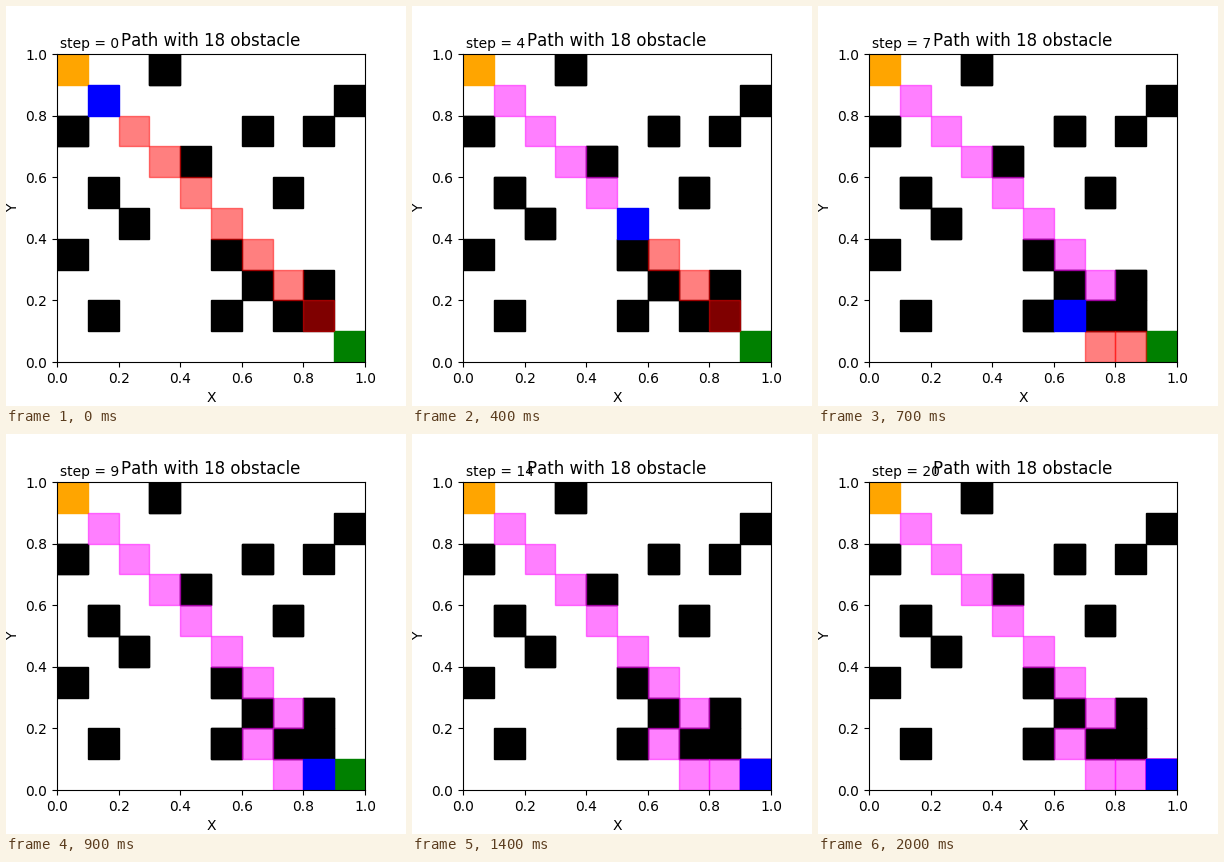
Write a matplotlib script that moves like this. It is 400 px wide and 400 px high and loops after 2.1 s.

```python
import matplotlib.pyplot as plt
from matplotlib.animation import FuncAnimation
from matplotlib.patches import Rectangle

N = 10
STEPS = 21
SIGHT = 2

# Cells are (column, row), row 0 at the top.
START, GOAL = (0, 0), (N - 1, N - 1)
BLOCKED_COLS = [[3], [9], [0, 6, 8], [4], [1, 7], [2], [0, 5], [6, 8], [1, 5, 7, 8]]
OBSTACLES = {(col, row) for row, cols in enumerate(BLOCKED_COLS) for col in cols}


def around(cell, reach=1):
    x, y = cell
    span = range(-reach, reach + 1)
    return [(x + dx, y + dy) for dx in span for dy in span
            if (dx or dy) and 0 <= x + dx < N and 0 <= y + dy < N]


def plan(origin, known):
    """Shortest way to the goal past the known obstacles, ties going down."""
    dist = {GOAL: 0}
    queue = [GOAL]
    for cell in queue:
        for near in around(cell):
            if near not in dist and near not in known:
                dist[near] = dist[cell] + 1
                queue.append(near)
    path = [origin]
    while path[-1] != GOAL:
        options = [c for c in around(path[-1]) if c in dist]
        path.append(min(options, key=lambda c: (dist[c], -c[1])))
    return path[1:]


def simulate():
    pos, path = START, plan(START, set())
    seen, trail, states = set(), [], []
    for _ in range(STEPS):
        if path:
            pos = path.pop(0)
        seen = seen | (OBSTACLES & set(around(pos, SIGHT)))
        if path and path[0] in seen:
            path = plan(pos, seen)
        states.append((pos, path[:-1], seen, trail[:]))
        trail.append(pos)
    return states


plt.rcParams["text.kerning_factor"] = 6
fig, ax = plt.subplots(figsize=(4, 4), dpi=100)
ax.set_aspect("equal")
ax.set_xlim(0, 1)
ax.set_ylim(0, 1)
ax.set_xlabel("X")
ax.set_ylabel("Y")
ax.set_title("Path with 18 obstacle")
label = ax.text(0.01, 1.02, "")


def add_cells(cells, color, alpha=None):
    return [ax.add_patch(Rectangle((col / N, (N - 1 - row) / N), 1 / N, 1 / N,
                                   color=color, alpha=alpha))
            for col, row in cells]


add_cells(OBSTACLES, "black")
add_cells([START], "orange")
add_cells([GOAL], "green")

states = simulate()
moving = []


def update(step):
    while moving:
        moving.pop().remove()
    pos, path, seen, trail = states[step]
    moving.extend(add_cells(seen, "black"))
    moving.extend(add_cells(path, "red", 0.5))
    moving.extend(add_cells(trail, "magenta", 0.5))
    moving.extend(add_cells([pos], "blue"))
    label.set_text(f"step = {step}")
    return [*moving, label]


anim = FuncAnimation(fig, update, frames=STEPS, interval=100,
                     repeat=True, repeat_delay=0, blit=False)
plt.show()
```
